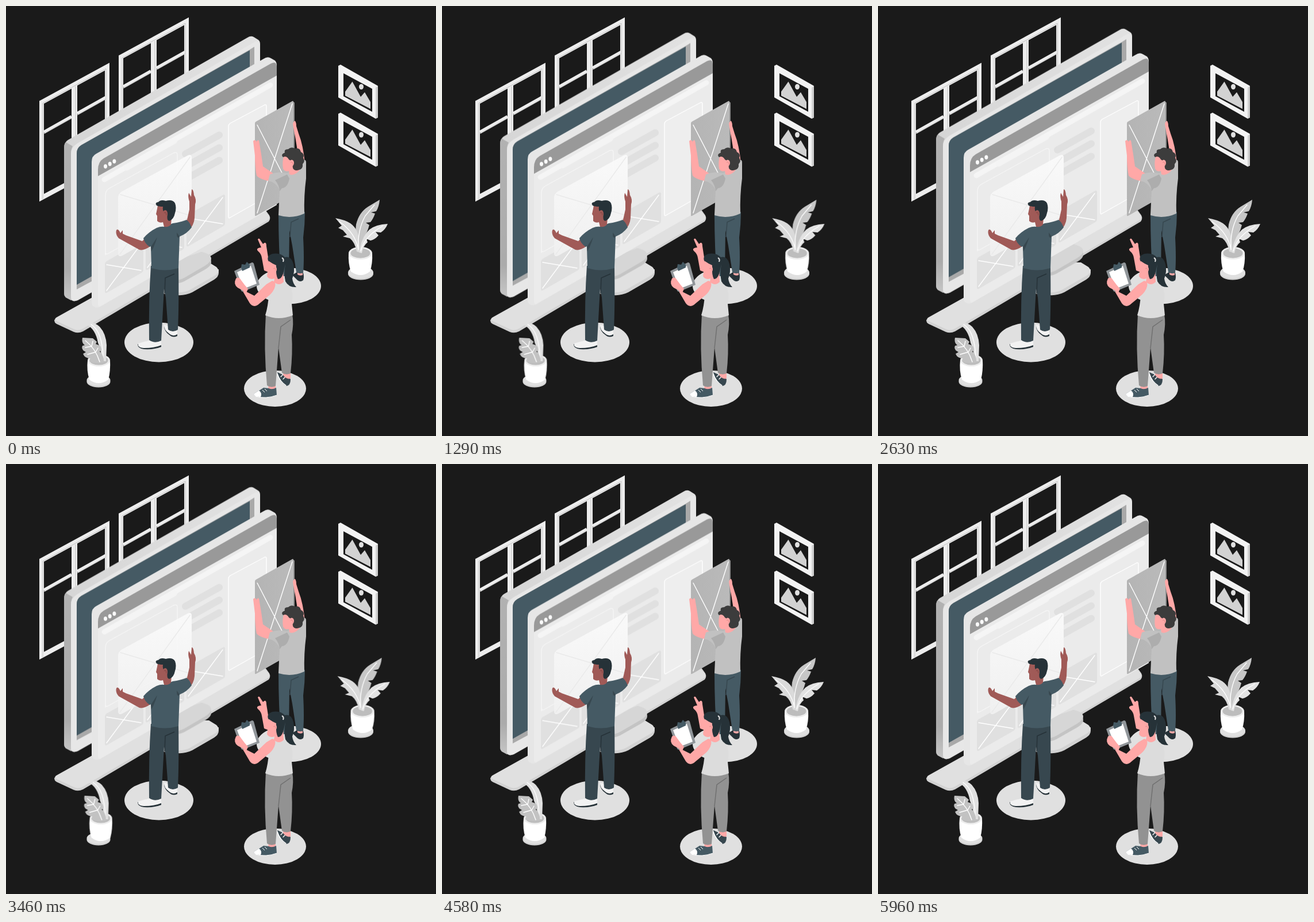
These frames come from a looping animation (748 px wide and 748 px high, 6 s). An HTML page:

```html
<!DOCTYPE html>
<html lang="en">
<head>
<meta charset="utf-8">
<title>Building a page</title>
<style>
html, body { margin: 0; width: 100%; height: 100%; overflow: hidden; background: #1a1a1a; }
svg { display: block; width: 100vw; height: 100vh; }
.monitor, .page, .plant { animation: 6s linear -20ms infinite; }
.monitor { animation-name: rise; }
.page { animation-name: drift; }
.plant { animation-name: shake; }
@keyframes rise { 50% { transform: translateY(-15px); } }
@keyframes drift {
  0%, 100% { transform: translateY(0); }
  21.5% { transform: translateY(-4px); }
  30.5% { transform: translateY(-7.5px); }
  43.8% { transform: translateY(-7px); }
  57.7% { transform: translateY(-10px); }
  76.3% { transform: translateY(-3.7px); }
}
@keyframes shake {
  0%, 100% { transform: translateX(0); }
  10%, 90% { transform: translateX(-1.5px); }
  20%, 80% { transform: translateX(3px); }
  30%, 50%, 70% { transform: translateX(-6px); }
  40%, 60% { transform: translateX(6px); }
}
.line { fill: none; stroke: #fff; stroke-width: 1.4; stroke-linecap: round; stroke-linejoin: round; }
.bar { fill: none; stroke: #e0e0e0; stroke-width: 12; stroke-linecap: round; }
.floor { fill: #e0e0e0; }
.slate { fill: #455a64; }
.navy { fill: #37474f; }
.ink { fill: #263238; }
.pink { fill: #ffa8a7; }
.brown { fill: #a05a57; }
</style>
</head>
<body>
<svg viewBox="0 0 748 748">
  <defs>
    <linearGradient id="side" x1="0" y1="0" x2="0" y2="1">
      <stop offset="0" stop-color="#b2b2b2"/><stop offset=".8" stop-color="#ababab"/><stop offset="1" stop-color="#c6c6c6"/>
    </linearGradient>
    <linearGradient id="top"><stop offset="0" stop-color="#d6d6d6"/><stop offset="1" stop-color="#e2e2e2"/></linearGradient>
    <linearGradient id="sheet" x1="0" y1="0" x2="0" y2="1">
      <stop offset="0" stop-color="#fafafa"/><stop offset="1" stop-color="#f0f0f0"/>
    </linearGradient>
    <linearGradient id="panel"><stop offset="0" stop-color="#b4b4b4"/><stop offset="1" stop-color="#bababa"/></linearGradient>

    <g id="window" fill="none">
      <g stroke="#ededed">
        <path stroke-width="8" d="M62 167.500L176 105.500V272.500L62 333.500Z"/>
        <path stroke-width="10" d="M119 136V304"/>
        <path stroke-width="5.500" d="M66 219.500L114 192.500M124 187L174 159"/>
      </g>
      <path stroke="#c2c2c2" d="M64 336V169L174 109V262M121 140V300M66 222L114 195M124 189.500L174 161.500"/>
    </g>

    <g id="picture">
      <path fill="#f3f3f3" d="M578 104L582 102L647 139V194L643 196L578 159Z"/>
      <path fill="#d0d0d0" d="M643 142L647 139V194L643 196Z"/>
      <path fill="#1a1a1a" d="M587 117L637 144V184L587 157Z"/>
      <path fill="#d2d2d2" d="M590 156V149L602.500 131.500L617 158L624 150L634 167V179Z"/>
      <ellipse cx="618" cy="140.500" rx="4" ry="4.800" fill="#e0e0e0"/>
    </g>

    <g id="tile">
      <path fill="#e0e0e0" d="M172 449Q172 446 175 444L235 410Q239 408 239 412V459Q239 462 236 464L175 499Q172 500 172 497Z"/>
      <path class="line" stroke-width="1" d="M175 495L235 414M175 450L235 460"/>
    </g>
  </defs>

  <use href="#window"/>
  <use href="#window" x="138" y="-79"/>
  <use href="#picture"/>
  <use href="#picture" y="83.500"/>

  <!-- stand -->
  <path fill="#d2d2d2" d="M84 546L450 353L458 364Q461 370 457 375L134 566Q126 570 118 567L88 553Q84 551 84 546Z"/>
  <path class="floor" d="M89 541L440 345L456 363Q461 368 456 372L134 561Q126 566 118 562L88 548Q82 545 89 541Z"/>
  <path fill="#d2d2d2" d="M280 470L370 458V464Q370 471 362 476L324 498Q312 504 298 503L270 500Z"/>
  <path class="floor" d="M270 462L340 446H353L366 454Q374 462 363 469L323 492Q312 499 298 498L270 495Z"/>

  <g class="monitor">
    <path fill="#c4c4c4" d="M270 455L340 428Q357 432 357 446Q357 452 347 458L310 479Q300 484 286 482Z"/>
    <path fill="#d6d6d6" d="M270 450L340 428Q357 431 357 440Q356 446 346 452L310 473Q298 479 286 477Z"/>
    <path fill="url(#top)" d="M101 247Q101 237 108 233L420 55Q426 51 431 54L439 59Q442 61 442 66V331L125 512Q118 515 110 510L104 507Q101 504 101 500Z"/>
    <path fill="url(#side)" d="M101 247Q101 241 104 237L116 244Q113 249 113 257V512L104 507Q101 504 101 500Z"/>
    <path fill="#e7e7e7" d="M113 257Q113 246 124 239L432 63Q442 58 442 70V331L124 512Q113 517 113 505Z"/>
    <path fill="#a9a9a9" d="M123 256Q123 247 131 242L424 76L432 71V326L123 493Z"/>
    <path class="slate" d="M123 256Q123 247 131 242L424 77V315L123 485Z"/>
  </g>

  <g class="page">
    <path fill="#e6e6e6" d="M149 271Q149 261 157 257L448 92Q455 87 461 91L468 95Q471 98 471 104V346L167 521Q159 527 153 523Q149 521 149 515Z"/>
    <path fill="#ebebeb" d="M160 285Q160 271 170 265L461 100Q471 95 471 106V346L165 522Q160 525 160 518Z"/>
    <path fill="#999" d="M160 285Q160 271 170 265L461 100Q471 95 471 106V121L160 296Z"/>
    <g fill="#fafafa">
      <ellipse cx="173" cy="279" rx="3" ry="3.700"/><ellipse cx="180.700" cy="274.700" rx="3" ry="3.700"/><ellipse cx="188.400" cy="270.300" rx="3" ry="3.700"/>
    </g>
    <path class="bar" style="stroke:#f5f5f5;stroke-width:9" d="M171 302L460 137.500"/>
    <path class="bar" style="stroke:#f4f4f4;stroke-width:10" d="M210 281.500L293 235"/>
    <path class="line" style="stroke:#f6f6f6" d="M173 433V329Q173 321 180 317L291 256Q298 253 298 259V363L179 430Q173 434 173 428Z"/>
    <path class="bar" d="M312 257.500L371 224.500M312 279.500L371 246.500M312 301.500L371 268.500"/>
    <path class="line" style="fill:#eee" d="M387 209Q387 206 390 204L450 172Q453 171 453 174V329Q453 332 450 334L390 368Q387 370 387 367Z"/>
    <use href="#tile"/>
    <use href="#tile" x="71" y="-40"/>
    <use href="#tile" x="142" y="-81"/>
  </g>

  <!-- sheet in the first man's hands -->
  <path fill="url(#sheet)" fill-opacity=".95" d="M195 334Q195 327 201 323L316 260Q323 257 323 264V358Q323 364 317 368L203 434Q195 438 195 430Z"/>
  <path class="line" style="stroke:#e9e9e9" d="M199 328L319 364M320 263L198 432"/>

  <!-- panel in the second man's hands -->
  <path fill="#8f8f8f" d="M499 166L502 168V329L499 330Z"/>
  <path fill="url(#panel)" d="M433 204Q433 202 435 201L498 165.500Q500 164.500 500 167V328L435 365Q433 366 433 364Z"/>
  <path class="line" d="M437 207L498 325M498 170L437 360"/>

  <!-- second man -->
  <ellipse class="floor" cx="492" cy="487" rx="56" ry="31.500"/>
  <path class="ink" d="M506 463L517 464Q519 472 517 477Q512 481 507 477L498 468Z"/>
  <path class="pink" d="M507 463H516V468Q511 470 507 467Z"/>
  <path class="slate" d="M474 360L520 358Q520 380 517 403Q519 440 517 464Q511 467 505 463L498 417L493 390L492 470H478Q474 420 474 360Z"/>
  <path fill="none" stroke="#37474f" stroke-width="1.500" d="M494 402L496 376L509 370"/>
  <path class="pink" d="M499 205Q500 200 503 200Q505 203 505 209L509 222Q517 242 520 274L509 272Q507 246 501 217Z"/>
  <path class="pink" d="M430 235Q433 231 436 236Q440 229 441 240L444 258L447 279L466 292L460 305Q442 302 436 295Q433 280 433 260Z"/>
  <path fill="#c1c1c1" d="M459 293Q473 287 489 291L510 281L512 269Q522 265 522 272V300Q518 330 519 361Q497 371 474 364L476 320Q469 306 456 304Z"/>
  <path fill="#adadad" d="M476 322Q475 311 468 303L489 293L493 300Q490 316 480 317Z"/>
  <path class="pink" d="M484 259Q480 270 482 283Q485 289 492 287L493 293Q503 296 511 285L507 259Z"/>
  <path fill="#3c3c3c" d="M482 263Q477 258 485 255Q483 249 491 249Q496 244 503 248Q511 246 513 254Q520 257 517 264Q521 270 516 275Q517 283 510 285Q502 288 499 282L498 271L492 267Q488 260 482 263Z"/>
  <ellipse class="pink" cx="497" cy="273" rx="4" ry="5.500"/>
  <path fill="none" stroke="#e28a89" d="M495 272Q499 270 499 276"/>

  <!-- first man -->
  <ellipse class="floor" cx="266" cy="585" rx="60" ry="34.500"/>
  <path class="ink" d="M275 556L298 569V574Q290 578 284 572Q275 566 275 556Z"/>
  <path fill="#f2f2f2" d="M275 554L283 557L298 566V571Q290 576 284 570Q274 563 275 554Z"/>
  <path class="ink" d="M229 588H270V593Q258 598 240 597Q229 596 229 588Z"/>
  <path fill="#f2f2f2" d="M230 587Q239 584 249 582L270 583V590Q258 595 240 595Q228 594 230 587Z"/>
  <path class="navy" d="M252 452H300Q301 520 299 563Q290 569 282 563L278 507L275 492L270 582Q259 588 249 581Q248 510 252 452Z"/>
  <path fill="none" stroke="#263238" stroke-width="1.500" d="M276 500L277 473L293 466"/>
  <path class="brown" d="M244 402L237 409L209 399L203 396L203 390L199 395Q195 386 192 390Q190 397 196 404L232 424Q240 426 251 418Z"/>
  <path class="brown" d="M306 380L315 372L319 354V340Q316 332 318 325L322 332L323 319Q326 318 327 329Q332 337 329 345L328 369Q327 382 317 391Z"/>
  <path class="slate" d="M262 386Q269 383 275 384L290 378Q304 376 314 372Q319 375 323 385Q315 396 302 401L300 456Q276 463 253 456L252 418L250 419Q241 413 239 404Q248 393 262 386Z"/>
  <path fill="#37474f" d="M252 419L263 402Q260 414 253 427ZM302 401Q297 407 297 394Z"/>
  <path class="brown" d="M264 347Q263 353 261 362L263 365V374Q267 378 273 376L275 384Q284 385 287 380L289 357L281 344Z"/>
  <path class="ink" d="M262 347Q258 342 265 341Q269 336 278 339Q290 336 294 343Q297 351 294 360Q292 371 284 374Q279 373 281 362L275 359Q272 355 273 349Q266 349 262 347Z"/>
  <ellipse class="brown" cx="277" cy="361" rx="4" ry="6"/>
  <path fill="none" stroke="#7f4441" d="M275 360Q279 357 279 364"/>

  <!-- woman -->
  <ellipse class="floor" cx="468" cy="665.500" rx="54" ry="31.500"/>
  <path class="navy" d="M472 637L483 642L495 649Q495 660 488 661Q477 656 472 637Z"/>
  <path class="line" d="M472 640Q477 654 487 660M478 645L482 641M482 649L486 645"/>
  <path class="pink" d="M482 636H495V648Q488 650 482 642ZM457 656H469V668Q461 671 456 666Z"/>
  <path class="slate" d="M432 674Q440 669 448 664L457 665Q463 668 470 664L471 677Q456 683 440 680Q431 679 432 674Z"/>
  <path fill="#fff" d="M432 674L440 669Q446 673 443 680Q430 680 432 674Z"/>
  <path fill="none" stroke="#fff" d="M434 679Q452 684 471 677M446 668L450 672M450 666L454 670"/>
  <path fill="#929292" d="M452 536H498Q501 553 497 572Q499 604 495 639Q487 643 480 638L474 594L469 661Q461 665 454 660Q448 595 452 536Z"/>
  <path fill="none" stroke="#707070" stroke-width="1.500" d="M474 595L478 558L495 546"/>
  <path class="pink" d="M438 406Q440 402 443 408L447 414Q453 408 453 418L456 437L459 464L449 460L445 438Q444 431 438 426Q434 421 444 420Z"/>
  <path fill="#dcdcdc" d="M465 479Q481 474 494 487Q501 499 497 518L499 538Q474 548 451 538Q456 522 457 503Z"/>
  <path class="pink" d="M463 478Q470 479 468 488Q466 497 456 505L438 520Q430 525 424 517L410 493L432 504L453 484Z"/>
  <path fill="#91969a" d="M397 461L428 446Q430 446 431 448L441 485L412 497Q410 497 409 495Z"/>
  <path fill="#fff" d="M402 463L426 452L436 483L413 492Z"/>
  <path class="slate" d="M409 455L410 449L416 450L419 445L424 450V455L411 461Z"/>
  <path class="pink" d="M400 474Q405 470 409 477L415 485L421 492L418 499Q411 494 403 490Q395 484 400 474Z"/>
  <path class="pink" d="M458 441Q454 452 455 463L454 470Q458 477 467 474L466 480Q475 488 483 480L482 452Z"/>
  <path class="ink" d="M456 443Q453 434 464 431Q477 429 485 437Q496 434 500 449Q503 463 498 474Q499 483 505 489Q492 490 486 479Q483 465 486 449L482 466Q479 475 473 475Q469 468 470 451Q463 448 456 443Z"/>
  <path fill="none" stroke="#e0e0e0" stroke-width="2" d="M480 438Q484 440 482 445"/>
  <ellipse class="pink" cx="467" cy="458" rx="4" ry="6"/>
  <path fill="none" stroke="#e28a89" d="M465 457Q469 454 469 460"/>

  <!-- right plant -->
  <ellipse fill="#d2d2d2" cx="617" cy="466" rx="22" ry="10.500"/>
  <ellipse class="floor" cx="617" cy="463.500" rx="22" ry="10.500"/>
  <g class="plant">
    <path fill="#fff" d="M596 429H637Q638 449 633 462Q617 474 600 462Q595 449 596 429Z"/>
    <ellipse fill="#ededed" cx="616.500" cy="430" rx="20.500" ry="11"/>
    <ellipse fill="#bdbdbd" cx="616.500" cy="430" rx="17" ry="8.500"/>
    <path fill="#c7c7c7" d="M611 427Q606 402 609 380Q614 359 630 349L650 337Q649 349 644 357L635 359L642 361Q639 370 634 376L626 377L632 381Q628 396 621 406L616 429Z"/>
    <path fill="#dadada" d="M610 427Q607 411 598 404L586 401L593 398L586 390L578 386L584 382L573 369Q590 372 599 378Q613 388 614 408L616 429Z"/>
    <path fill="#e2e2e2" d="M615 429Q617 404 632 389Q643 380 664 379Q660 389 652 394L643 393L648 399Q641 407 634 408L627 405L629 411Q621 417 619 430Z"/>
    <path class="line" d="M613 424Q611 390 625 365L641 346M613 424Q608 395 580 375M617 426Q624 400 655 383"/>
  </g>

  <!-- left plant -->
  <ellipse fill="#d2d2d2" cx="161" cy="653.500" rx="20.500" ry="10"/>
  <ellipse class="floor" cx="161" cy="651" rx="20.500" ry="10"/>
  <g class="plant">
    <path fill="#fff" d="M142 616H181Q182 635 178 650Q161 662 145 650Q140 635 142 616Z"/>
    <ellipse fill="#ededed" cx="161.500" cy="616.500" rx="19.500" ry="10.500"/>
    <ellipse fill="#bdbdbd" cx="161.500" cy="616.500" rx="16" ry="8"/>
    <path fill="#e0e0e0" d="M139 553Q150 546 163 558Q174 570 175 590L174 618H165Q167 600 160 586Q156 562 139 553Z"/>
    <path class="line" d="M148 554Q168 566 169 614"/>
    <path fill="#c2c2c2" d="M133 577L151 578L158 584L156 588Q166 590 166 598L163 601Q171 608 170 620L160 621Q149 621 145 618L147 613Q137 613 134 605L139 602Q130 598 133 591L137 590Q131 586 133 577Z"/>
    <path class="line" d="M138 582Q156 596 163 619M149 592L151 583M156 602L160 595M149 592L138 594M156 602L142 606"/>
  </g>
</svg>
</body>
</html>
```
